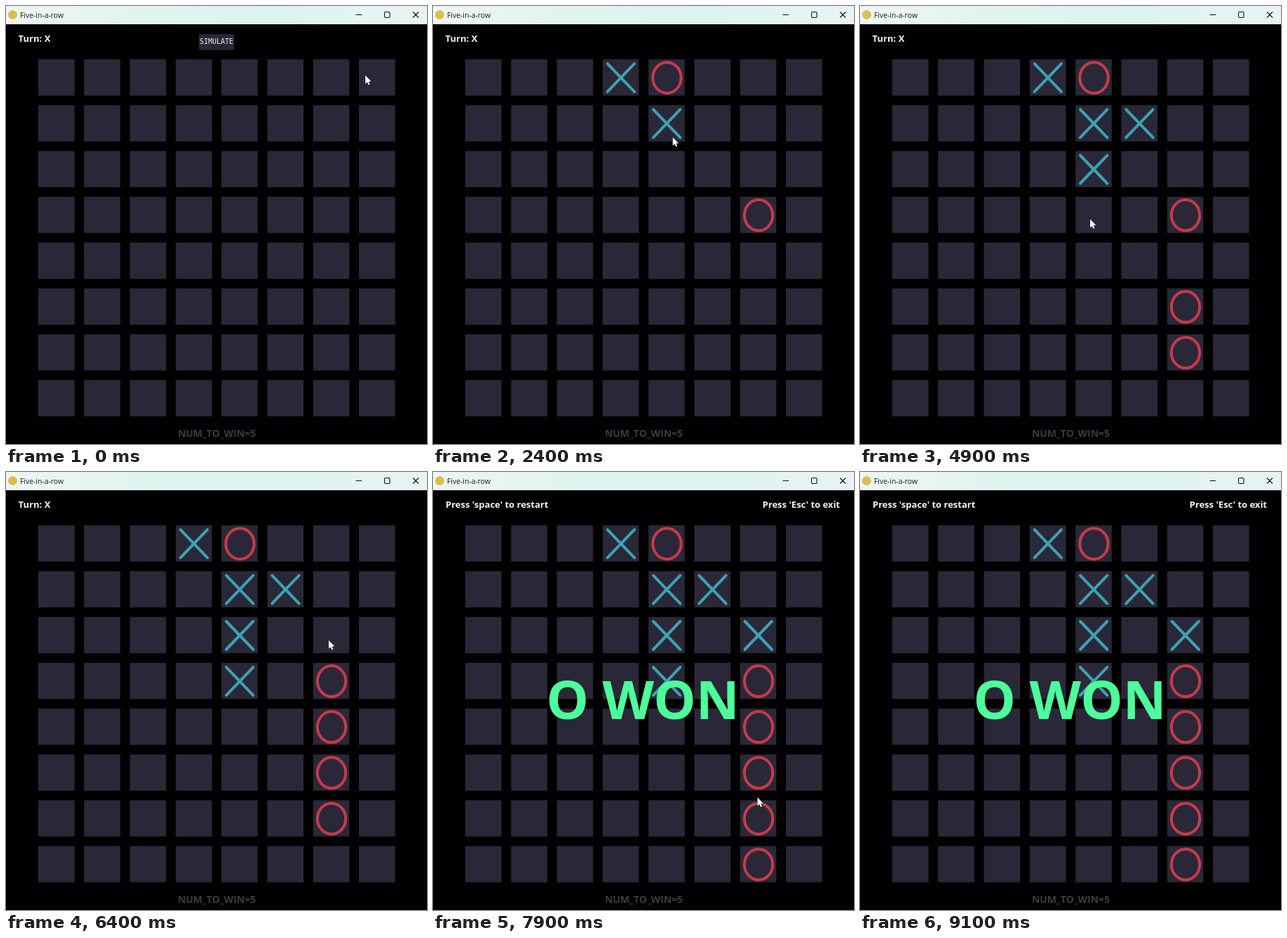
An HTML page with a canvas that plays this animation: 600x624 px, repeating every 9200 ms.

```html
<!DOCTYPE html>
<html lang="en">
<head>
<meta charset="utf-8">
<title>Five-in-a-row</title>
<style>
  html, body { margin: 0; width: 100%; height: 100%; overflow: hidden; background: #000; }
  canvas { display: block; }
</style>
</head>
<body>
<canvas id="stage" width="600" height="624"></canvas>
<script>
const ctx = document.getElementById('stage').getContext('2d');
const LOOP = 9200, STEP = 100, TRAVEL = 240;
const LEFT = 46, TOP = 76, PITCH = 65.28, SIZE = 51.6, COUNT = 8;
const CELL = '#2a2838', TEAL = '#3ea2b4', RED = '#c83a4a', GREEN = '#4dff9b', WHITE = '#f4f4f4';

// Pointer stops in grid units; each one is a click on the cell it lies in.
const CLICKS = [[3.28, 0.44], [4.53, 1.7], [5.35, 1.45], [4.44, 2.45], [4.32, 3.49], [6.34, 2.51]];
const REPLY_ROWS = [0, 3, 5, 6, 4, 7];

// Turns and replies slow down as the game goes on.
const clickTime = i => 600 + 980 * i + 60 * i * i;
const replyTime = i => clickTime(i) + 100 + 100 * i;
const GAME_OVER = replyTime(CLICKS.length - 1);

// The pointer waits over its cell longer before each new click.
const legs = CLICKS.map((at, i) => ({ at, end: clickTime(i) - 40 * i * i }));
legs.push({ at: [6.38, 5.94], end: GAME_OVER + TRAVEL }, { at: [6.6, 8.8], end: GAME_OVER + 600 });

const arrow = new Path2D('M0 0V12L2.7 9.6L4.6 13.6L6.5 12.7L4.7 8.8L8.3 8.4Z');

function text(str, x, y, size, color, align = 'left', family = '"Open Sans", sans-serif', weight = 700) {
  ctx.font = `${weight} ${size}px ${family}`;
  ctx.fillStyle = color;
  ctx.textAlign = align;
  ctx.fillText(str, x, y);
}

function pen(color, width, cap = 'butt') {
  ctx.strokeStyle = color;
  ctx.lineWidth = width;
  ctx.lineCap = cap;
  ctx.beginPath();
}

function addCross(x, y, a, b) {
  for (const side of [-1, 1]) {
    ctx.moveTo(x - a * side, y - b);
    ctx.lineTo(x + a * side, y + b);
  }
}

function drawTitleBar() {
  const shade = ctx.createLinearGradient(0, 0, 600, 0);
  ['#eff5f4', '#e0f4f0', '#def4f0', '#e8f4f3'].forEach((color, i) => shade.addColorStop(i / 3, color));
  ctx.fillStyle = shade;
  ctx.fillRect(0, 0, 600, 26);

  ctx.fillStyle = '#d8c04c';
  ctx.beginPath();
  ctx.arc(9.5, 12.5, 6.5, 0, Math.PI * 2);
  ctx.fill();

  text('Five-in-a-row', 20, 16.5, 10.4, '#181c1c', 'left', '"Open Sans", sans-serif', 400);
  pen('#111', 1.1);
  ctx.moveTo(498.5, 12.5);
  ctx.lineTo(507, 12.5);
  ctx.roundRect(539.5, 8.5, 7.5, 8, 1.2);
  addCross(584, 12.5, 4, 4);
  ctx.stroke();
}

function drawGrid() {
  ctx.fillStyle = CELL;
  for (let i = 0; i < COUNT * COUNT; i++)
    ctx.fillRect(LEFT + (i % COUNT) * PITCH, TOP + Math.floor(i / COUNT) * PITCH, SIZE, SIZE);
}

function drawMark(mark, col, row) {
  const x = LEFT + col * PITCH + 26, y = TOP + row * PITCH + 26.2;
  if (mark === 'X') {
    pen(TEAL, 4, 'round');
    addCross(x, y, 19.2, 20);
  } else {
    pen(RED, 4);
    ctx.ellipse(x + 0.3, y, 20.2, 22, 0, 0, Math.PI * 2);
  }
  ctx.stroke();
}

function drawMarks(t) {
  CLICKS.forEach(([col, row], i) => {
    if (t >= clickTime(i)) drawMark('X', Math.floor(col), Math.floor(row));
    if (t >= replyTime(i)) drawMark('O', i ? 6 : 4, REPLY_ROWS[i]);
  });
}

function drawLabels(t) {
  if (t < GAME_OVER) {
    text('Turn: X', 17.5, 51, 13.1, WHITE);
  } else {
    text("Press 'space' to restart", 18, 51, 13, WHITE);
    text("Press 'Esc' to exit", 580, 51, 13, WHITE, 'right');
    text('O WON', 299, 351.5, 76, GREEN, 'center');
  }
  if (t < clickTime(0)) {
    ctx.fillStyle = CELL;
    ctx.fillRect(275, 40, 50, 22.5);
    text('SIMULATE', 300, 54, 10, '#eee', 'center', '"DejaVu Sans Mono", monospace', 400);
  }
  text('NUM_TO_WIN=5', 300.5, 614, 14, '#3b3b3d', 'center');
}

function pointerAt(t) {
  let [col, row] = [7.14, 0.35];
  for (const { at, end } of legs) {
    const u = Math.min(1, Math.max(0, 1 - (end - t) / TRAVEL));
    const ease = u * u * (3 - 2 * u);
    col += (at[0] - col) * ease;
    row += (at[1] - row) * ease;
  }
  return [LEFT + col * PITCH, TOP + row * PITCH];
}

function drawPointer(t) {
  ctx.save();
  ctx.translate(...pointerAt(t));
  ctx.strokeStyle = '#111';
  ctx.lineWidth = 1;
  ctx.stroke(arrow);
  ctx.fillStyle = '#fff';
  ctx.fill(arrow);
  ctx.restore();
}

function draw(t) {
  ctx.fillStyle = '#000';
  ctx.fillRect(0, 0, 600, 624);
  drawTitleBar();
  drawGrid();
  drawMarks(t);
  drawLabels(t);
  drawPointer(t);
}

const start = performance.now();
function tick() {
  const t = (performance.now() - start) % LOOP;
  draw(Math.floor(t / STEP) * STEP);
  requestAnimationFrame(tick);
}
tick();
</script>
</body>
</html>
```
